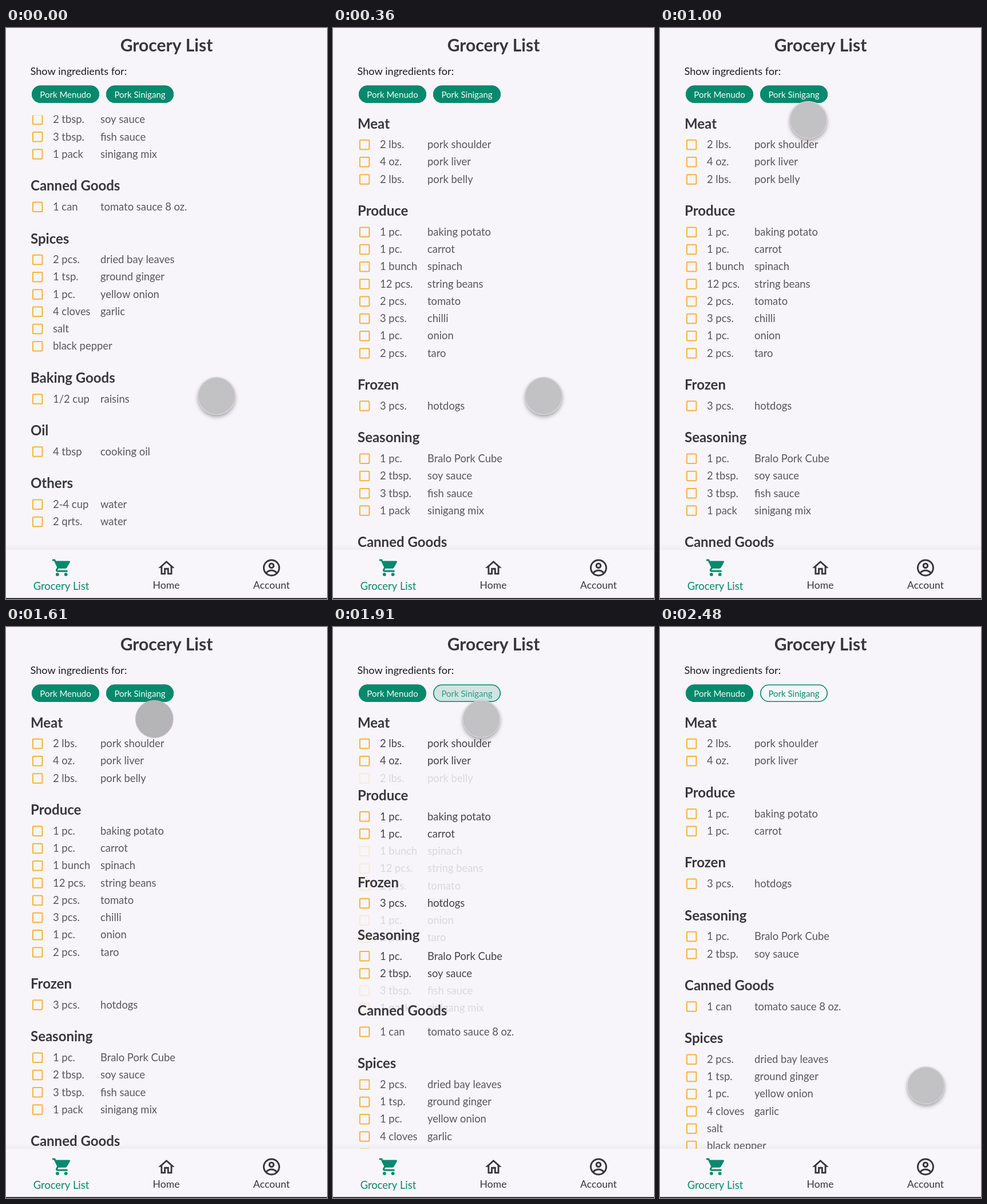
Animation of 561x998 px, one loop 2.51 s. Source, as an HTML page with a canvas:

```html
<!DOCTYPE html>
<html lang="en">
<head>
<meta charset="utf-8">
<title>Grocery List</title>
<style>
  html, body { margin: 0; width: 100%; height: 100%; overflow: hidden; background: #f7f5f9; }
  canvas { display: block; }
</style>
</head>
<body>
<canvas id="stage" width="561" height="998"></canvas>
<script>
const ctx = document.getElementById('stage').getContext('2d');
const LOOP = 2510;
const W = 561, H = 998;
const BG = '#f7f5f9', GREEN = '#07896d', DARK = '#38373c', AMBER = '#f3b43c';
const FIRST_Y = 167, HEAD_GAP = 37, ROW_GAP = 30.25, SECTION_GAP = 55.2;
const MAX_SCROLL = 623, LIST_TOP = 152.5, NAV_TOP = 912;

// Rows marked with "*" belong only to the second dish.
const sections = [
  ['Meat', '2 lbs.|pork shoulder', '4 oz.|pork liver', '*2 lbs.|pork belly'],
  ['Produce', '1 pc.|baking potato', '1 pc.|carrot', '*1 bunch|spinach', '*12 pcs.|string beans',
    '*2 pcs.|tomato', '*3 pcs.|chilli', '*1 pc.|onion', '*2 pcs.|taro'],
  ['Frozen', '3 pcs.|hotdogs'],
  ['Seasoning', '1 pc.|Bralo Pork Cube', '2 tbsp.|soy sauce', '*3 tbsp.|fish sauce', '*1 pack|sinigang mix'],
  ['Canned Goods', '1 can|tomato sauce 8 oz.'],
  ['Spices', '2 pcs.|dried bay leaves', '1 tsp.|ground ginger', '1 pc.|yellow onion',
    '4 cloves|garlic', 'salt', 'black pepper'],
  ['Baking Goods', '1/2 cup|raisins'],
  ['Oil', '4 tbsp|cooking oil'],
  ['Others', '2-4 cup|water', '2 qrts.|water']
].map(([title, ...rows]) => ({
  title,
  rows: rows.map(row => ({ optional: row[0] === '*', cells: row.replace('*', '').split('|') }))
}));

const clamp = v => Math.max(0, Math.min(1, v));
const lerp = (a, b, k) => a + (b - a) * k;
const span = (t, from, to) => clamp((t - from) / (to - from));
const smooth = k => k * k * (3 - 2 * k);

// CSS "ease-out": cubic-bezier(0, 0, .58, 1)
function easeOut(x) {
  if (x <= 0 || x >= 1) return x;
  let lo = 0, hi = 1;
  for (let i = 0; i < 20; i++) {
    const u = (lo + hi) / 2;
    if (3 * (1 - u) * u * u * 0.58 + u ** 3 < x) lo = u; else hi = u;
  }
  return 3 * (1 - lo) * lo * lo + lo ** 3;
}

function text(str, x, y, size, color, { bold = false, align = 'left' } = {}) {
  ctx.font = `${bold ? 700 : 400} ${size}px Lato, "Open Sans", sans-serif`;
  ctx.textAlign = align;
  ctx.fillStyle = color;
  ctx.fillText(str, x, y);
}

function circle(x, y, r) {
  ctx.beginPath();
  ctx.arc(x, y, r, 0, Math.PI * 2);
}

function roundBox(x, y, w, h, r) {
  ctx.beginPath();
  ctx.roundRect(x, y, w, h, r);
}

function chip(label, x, off) {
  roundBox(x, 100.5, 118, 30.5, 15.25);
  ctx.globalAlpha = 1 - off;
  ctx.fillStyle = GREEN;
  ctx.fill();
  ctx.globalAlpha = 1;
  roundBox(x + 0.8, 101.3, 116.4, 28.9, 14.45);
  ctx.lineWidth = 1.6;
  ctx.strokeStyle = GREEN;
  ctx.stroke();
  const color = `rgb(${lerp(245, 7, off)}, ${lerp(252, 137, off)}, ${lerp(250, 109, off)})`;
  text(label, x + 59, 122, 15, color, { align: 'center' });
}

function drawRow(cells, y, color) {
  roundBox(46.9, y - 8.3, 16.5, 16.5, 1);
  ctx.lineWidth = 2;
  ctx.strokeStyle = AMBER;
  ctx.stroke();
  text(cells[0], 82, y + 6.2, 18.4, color);
  if (cells[1]) text(cells[1], 165, y + 6.2, 18.4, color);
}

function drawList(scroll, filter) {
  ctx.save();
  ctx.beginPath();
  ctx.rect(0, LIST_TOP, W, NAV_TOP - LIST_TOP);
  ctx.clip();
  const blending = filter > 0 && filter < 1;
  let fullY = FIRST_Y, shortY = FIRST_Y;
  sections.forEach(({ title, rows }, index) => {
    const y = lerp(fullY, shortY, filter) - scroll;
    const color = blending && index < 4 ? '#454449' : '#59585d';
    rows.forEach(({ cells, optional }, i) => {
      ctx.globalAlpha = optional ? 1 - filter : 1;
      drawRow(cells, y + HEAD_GAP + i * ROW_GAP, color);
    });
    ctx.globalAlpha = 1;
    text(title, 43, y + 8.5, 24, DARK, { bold: true });
    const height = n => HEAD_GAP + (n - 1) * ROW_GAP + SECTION_GAP;
    fullY += height(rows.length);
    shortY += height(rows.filter(row => !row.optional).length);
  });
  ctx.restore();
}

function icon(x, y, scale, draw) {
  ctx.save();
  ctx.translate(x, y);
  ctx.scale(scale, scale);
  draw();
  ctx.restore();
}

const cartBody = new Path2D('M1 2H4.3L5.2 4H21Q22.4 4.2 21.8 5.5L18.2 12Q17.6 13 16.5 13H8.1L7.1 14.8Q7.1 15 7.4 15H19V17H7Q4.4 16.7 5.2 14L6.6 11.6L3 4H1Z');
const house = new Path2D('M12 5.7L17 10.2V18H15V12H9V18H7V10.2ZM12 3L2 12H5V20H11V14H13V20H19V12H22Z');
const shoulders = new Path2D('M5.8 18Q8.5 15 12 15T18.2 18');

function drawNav() {
  const shade = ctx.createLinearGradient(0, NAV_TOP - 10, 0, NAV_TOP);
  shade.addColorStop(0, 'rgba(60, 55, 70, 0)');
  shade.addColorStop(1, 'rgba(60, 55, 70, 0.045)');
  ctx.fillStyle = shade;
  ctx.fillRect(0, NAV_TOP - 10, W, 10);
  ctx.fillStyle = '#f8f6fa';
  ctx.fillRect(0, NAV_TOP, W, H - NAV_TOP);

  icon(79.5, 925.5, 1.48, () => {
    ctx.fillStyle = GREEN;
    ctx.fill(cartBody);
    for (const x of [7, 17]) {
      circle(x, 20, 2);
      ctx.fill();
    }
  });
  icon(263.3, 926.7, 1.43, () => {
    ctx.fillStyle = DARK;
    ctx.fill(house, 'evenodd');
  });
  icon(446, 925.5, 1.5, () => {
    ctx.strokeStyle = DARK;
    ctx.lineWidth = 2;
    circle(12, 12, 9);
    ctx.stroke();
    circle(12, 9.5, 2.5);
    ctx.stroke();
    ctx.stroke(shoulders);
  });
  text('Grocery List', 96.5, 981.5, 18.4, GREEN, { align: 'center' });
  text('Home', 280, 980.3, 17.6, DARK, { align: 'center' });
  text('Account', 464, 980.3, 17.6, DARK, { align: 'center' });

  ctx.fillStyle = '#111';
  ctx.fillRect(0, 996.4, W, 1.6);
}

function cursorAt(t) {
  if (t < 1900) {
    const k = smooth(span(t, 560, 970));
    return [lerp(368, 259.3, k), lerp(643.3, 160.7, k)];
  }
  const k = smooth(span(t, 2000, 2485));
  const bend = (a, b, c) => lerp(lerp(a, b, k), lerp(b, c, k), k);
  return [bend(259.3, 346, 464.8), bend(160.7, 520, 801.5)];
}

function drawCursor(t) {
  const [x, y] = cursorAt(t);
  const press = span(t, 1520, 1590) - span(t, 1660, 1740);
  ctx.save();
  ctx.shadowColor = `rgba(0, 0, 0, ${0.3 * (1 - press)})`;
  ctx.shadowBlur = 6;
  ctx.shadowOffsetY = 4;
  circle(x, y, 33);
  const edge = lerp(250, 198, press);
  ctx.fillStyle = `rgb(${edge}, ${edge}, ${edge})`;
  ctx.fill();
  ctx.restore();
  circle(x, y, 32.2);
  const gray = lerp(194, 181, press);
  ctx.fillStyle = `rgb(${gray}, ${gray - 1}, ${gray + 1})`;
  ctx.fill();
  circle(x, y, 33.1);
  ctx.lineWidth = 0.6;
  ctx.strokeStyle = 'rgba(135, 133, 137, 0.5)';
  ctx.stroke();
}

function render(t) {
  const scroll = MAX_SCROLL * (1 - smooth(span(t, 10, 340)));
  const filter = easeOut(span(t, 1713, 2013));
  ctx.fillStyle = BG;
  ctx.fillRect(0, 0, W, H);
  text('Grocery List', 280.5, 40.5, 30, DARK, { bold: true, align: 'center' });
  text('Show ingredients for:', 42.5, 82.3, 18.1, '#1d1c20');
  chip('Pork Menudo', 45, 0);
  chip('Pork Sinigang', 175, filter);
  drawList(scroll, filter);
  drawNav();
  drawCursor(t);
}

const start = performance.now();
function tick() {
  render((performance.now() - start) % LOOP);
  requestAnimationFrame(tick);
}
tick();
</script>
</body>
</html>
```
